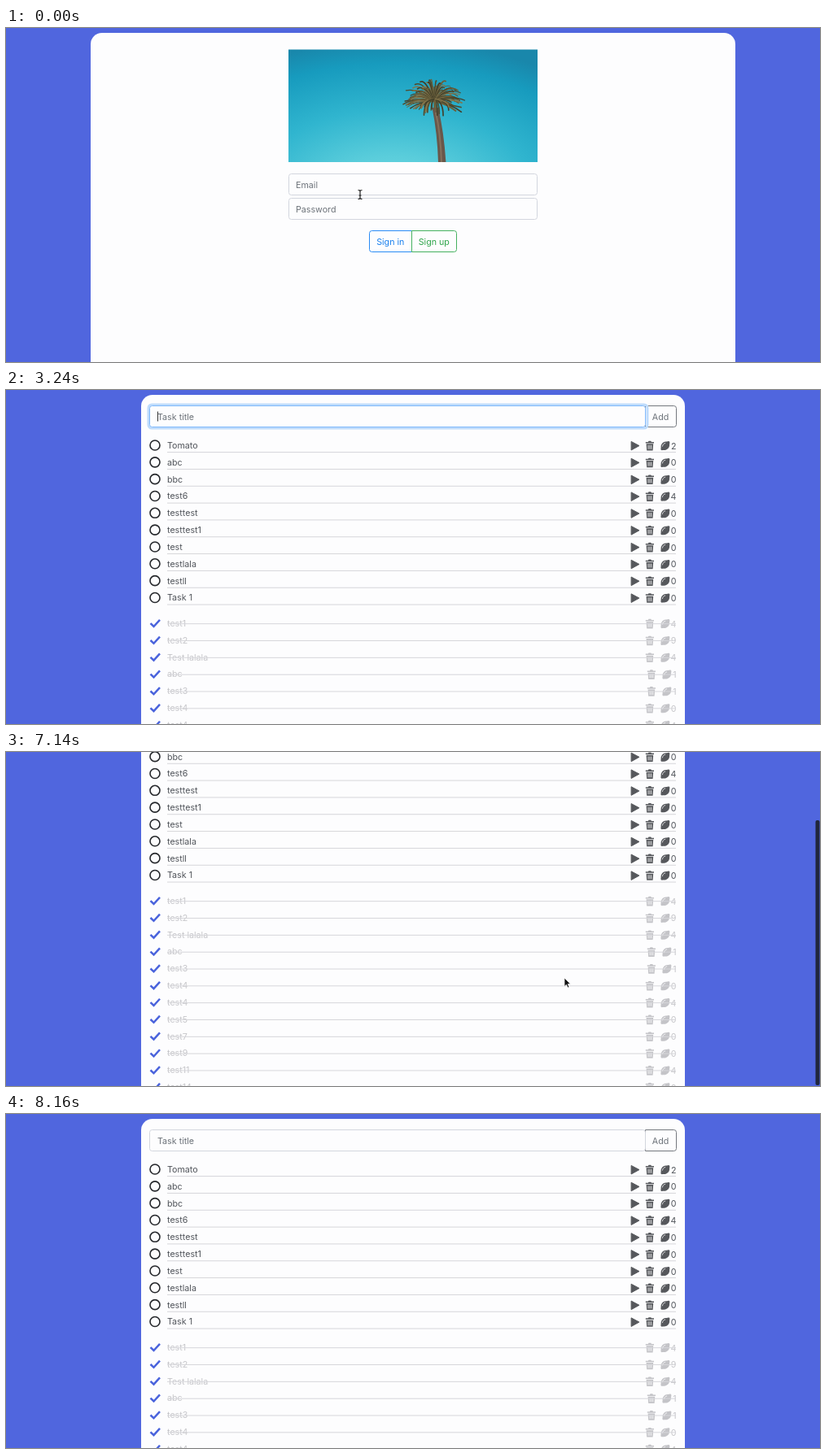
An HTML page for the animation above (8.19 s loop, 1000x411 px).

```html
<!DOCTYPE html>
<html lang="en">
<head>
<meta charset="utf-8">
<title>Task list</title>
<style>
html, body { margin: 0; width: 100%; height: 100%; overflow: hidden; background: #5066de; }
svg { display: block; width: 1000px; height: 411px; }
text { font: 10.7px Inter, "Open Sans", sans-serif; fill: #50545a; }
.hint { fill: #6c7279; }
.panel { fill: #fdfdfe; }
.field { fill: #fdfdfe; stroke: #d3d6de; }
.focus { stroke: #80b9fb; }
.ring { fill: none; stroke: #bfdcfc; stroke-width: 3; }
.line { stroke: #d6d6da; stroke-width: 1; }
.done text { fill: #c6c6ca; }
.done .ico { color: #c4c4c8; }
.ico { color: #56585c; }
#pass.value { letter-spacing: -1px; }
</style>
</head>
<body>
<svg id="stage" viewBox="0 0 1000 411">
  <defs>
    <radialGradient id="sky" gradientUnits="userSpaceOnUse" cx="0" cy="0" r="1"
      gradientTransform="translate(475 205) scale(320 190)">
      <stop offset="0" stop-color="#76dbe4"/>
      <stop offset=".25" stop-color="#5acddb"/>
      <stop offset=".55" stop-color="#30b5cf"/>
      <stop offset=".85" stop-color="#179bbe"/>
      <stop offset="1" stop-color="#1987ab"/>
    </radialGradient>
    <clipPath id="frame"><rect x="347" y="26.5" width="306" height="138.5"/></clipPath>
    <g id="play"><path d="M.6-5.2 10.4 0 .6 5.4Z" fill="currentColor" stroke="currentColor" stroke-linejoin="round"/></g>
    <g id="trash">
      <path d="M0-4.9H3L3.7-6H6.5L7.2-4.9H10.2V-3.4H0ZM.8-2.6H9.4L8.8 5.6H1.4Z" fill="currentColor"/>
      <path d="M3.2-1V4M5.1-1V4M7-1V4" stroke="#fdfdfe" stroke-width=".8"/>
    </g>
    <g id="lemon">
      <path d="M11-5.4C9.5-6.2 8.5-5 7-5.2 3.5-5.5.3-2 .6 1.6.7 3 0 4 .8 5 1.7 5.8 2.6 5.1 4 5.2 8 5.5 11.5 2 11.1-1.6 11-3 11.9-4.2 11-5.4Z" fill="currentColor"/>
      <path d="M2.4.8C2.6-1.4 4-3 6.1-3.4" fill="none" stroke="#fdfdfe" stroke-width=".8"/>
    </g>
  </defs>

  <g id="login">
    <rect class="panel" x="104" y="6" width="792" height="440" rx="14"/>
    <g clip-path="url(#frame)">
      <rect x="347" y="26" width="306" height="140" fill="url(#sky)"/>
      <path d="M523.5 98Q530 130 531 166H540.5Q538 128 531 98Z" fill="#69574a"/>
      <path d="M528 104Q534 130 535 166" fill="none" stroke="#85705c" stroke-width="2"/>
      <g id="palm" fill="none" stroke-linecap="round"></g>
    </g>
    <rect id="mailRing" class="ring" x="345.5" y="178" width="309" height="29" rx="4"/>
    <rect id="mailBox" class="field" x="347.5" y="179.5" width="305" height="26" rx="3"/>
    <text id="mail" x="356" y="196.5"></text>
    <rect id="passRing" class="ring" x="345.5" y="207.5" width="309" height="29.5" rx="4"/>
    <rect id="passBox" class="field" x="347.5" y="209.5" width="305" height="26" rx="3"/>
    <text id="pass" x="356" y="226.5"></text>
    <path id="signIn" d="M498.5 249.5H449.5Q446.5 249.5 446.5 252.5V272.5Q446.5 275.5 449.5 275.5H498.5Z" stroke="#2a8cf5"/>
    <path class="panel" d="M498.5 249.5H550.5Q553.5 249.5 553.5 252.5V272.5Q553.5 275.5 550.5 275.5H498.5Z" stroke="#45b15f"/>
    <text id="signInText" x="472.3" y="266.7" text-anchor="middle">Sign in</text>
    <text x="525.8" y="266.7" text-anchor="middle" style="fill:#2ea44a">Sign up</text>
  </g>

  <g id="tasks">
    <rect class="panel" x="166" y="6" width="668" height="640" rx="14"/>
    <path class="panel" d="M785.5 19.5H820.5Q823.5 19.5 823.5 22.5V42.5Q823.5 45.5 820.5 45.5H785.5Z" stroke="#74787e"/>
    <text class="hint" x="804" y="36.8" text-anchor="middle">Add</text>
    <rect id="taskRing" class="ring" x="175" y="18" width="613" height="29" rx="4"/>
    <rect id="taskBox" class="field" x="176.5" y="19.5" width="609" height="26" rx="3"/>
    <text id="title" x="186" y="36.8"></text>
    <g id="open"></g>
    <g id="done" class="done"></g>
  </g>

  <path id="caret" stroke="#333" d="M0-6V6"/>
  <rect id="bar" x="994.5" width="5" rx="2" fill="#20263c"/>
  <g id="beam" fill="none" stroke="#222" stroke-width="1.2"><path d="M-2.5-5.5Q0-5.5 0-4Q0-5.5 2.5-5.5M0-4V4M-2.5 5.5Q0 5.5 0 4Q0 5.5 2.5 5.5M-1.5 1H1.5"/></g>
  <path id="arrow" d="M0 0V10.5L2.4 8.3 4.2 12 5.9 11.2 4.2 7.6H7.4Z" fill="#111" stroke="#fff" stroke-width=".7"/>
  <path id="hand" d="M-2-6Q-1-7 0-6L1.2-2 4-1.4Q6-1 5.7 1.2L5 4.8H-1L-4.6.6Q-4.4-1-2.6.2L-1.2 1Z" fill="#fff" stroke="#222" stroke-linejoin="round"/>
</svg>
<script>
const LOOP = 8190, STEP = 20.83;
const $ = id => document.getElementById(id);
const show = (id, on) => $(id).setAttribute("visibility", on ? "visible" : "hidden");
const move = (id, x, y) => $(id).setAttribute("transform", `translate(${x} ${y})`);

const OPEN = [["Tomato", 2], ["abc", 0], ["bbc", 0], ["test6", 4], ["testtest", 0], ["testtest1", 0],
  ["test", 0], ["testlala", 0], ["testll", 0], ["Task 1", 0]];
const DONE = [["test1", 4], ["test2", 9], ["Test lalala", 4], ["abc", 1], ["test3", 1], ["test4", 0],
  ["test4", 4], ["test5", 0], ["test7", 0], ["test9", 0], ["test11", 4], ["test14", 0]];

function row([name, count], i, done) {
  const y = (done ? 287 : 68) + i * STEP, dx = count === 1 ? 2 : 0;
  const mark = done
    ? `<path d="M177.5 .2 181.5 4 189-4.2" fill="none" stroke="#4a63dc" stroke-width="2.5"/>`
    : `<circle cx="183" r="6" fill="none" stroke="#26282c" stroke-width="1.6"/>`;
  const lineY = done ? .7 : 8.6;
  const play = done ? "" : `<use href="#play" x="767.5" y=".6"/>`;
  return `<g transform="translate(0 ${y.toFixed(2)})">${mark}<text x="198" y="4">${name}</text>
    <g class="ico">${play}<use href="#trash" x="${785.8 + dx}" y=".8"/><use href="#lemon" x="${804 + dx}" y=".8"/></g>
    <text x="823.5" y="4.6" text-anchor="end">${count}</text>
    <path class="line" d="M198 ${lineY}H823"/></g>`;
}
$("open").innerHTML = OPEN.map((r, i) => row(r, i, false)).join("");
$("done").innerHTML = DONE.map((r, i) => row(r, i, true)).join("");

// Spiky fronds around the crown
let seed = 7;
const rnd = () => (seed = seed * 16807 % 2147483647) / 2147483647;
const tones = ["#4f4a2e", "#6a5f3a", "#83744a", "#433f2a"];
let fronds = "";
for (let i = 0; i < 70; i++) {
  const a = Math.PI * (.82 + 1.36 * i / 69), len = .55 + .45 * rnd();
  const x = 525.5 + Math.cos(a) * 39 * len, y = 86 + Math.sin(a) * 24 * len;
  const drop = Math.abs(Math.cos(a)) * 9 * rnd();
  fronds += `<path d="M526 90Q${526 + (x - 526) * .6} ${y - 3} ${x} ${y + drop}" stroke="${tones[i % 4]}" stroke-width="${.9 + rnd()}"/>`;
}
for (let i = 0; i < 20; i++) {
  const x = 508 + 36 * rnd();
  fronds += `<path d="M526 87Q${x} 90 ${x} ${96 + 12 * rnd()}" stroke="${tones[i % 4]}" stroke-width="1.7"/>`;
}
$("palm").innerHTML = fronds;

// Rows of [time, values...], eased between neighbours
function at(track, t) {
  let i = 0;
  while (i < track.length - 1 && track[i + 1][0] <= t) i++;
  const a = track[i], b = track[i + 1] || a;
  const p = b === a ? 0 : Math.max(0, (t - a[0]) / (b[0] - a[0])), e = p * p * (3 - 2 * p);
  return a.slice(1).map((v, k) => v + (b[k + 1] - v) * e);
}
const POINTER = [[0, 435, 205], [120, 428, 194], [780, 452, 226], [900, 470, 262], [1200, 479, 272], [1500, 481, 279],
  [1740, 481, 279], [2250, 440, 34], [3400, 440, 40], [3750, 200, 72], [4150, 184, 250], [4500, 184, 376],
  [4850, 772, 252], [5250, 812, 252], [5480, 793, 258], [5800, 793, 258], [6500, 700, 275], [6750, 686, 278]];
const SCROLL = [[6820, 0], [7140, 104], [7380, 118], [7620, 118], [8010, 0]];
const typed = (s, t, from, to) => s.slice(0, Math.max(0, Math.floor((t - from) / (to - from) * s.length + .001)));
const within = (t, a, b) => t >= a && t < b;

function field(id, value, hint) {
  $(id).textContent = value || hint;
  $(id).setAttribute("class", value ? "value" : "hint");
}
function focus(name, on) {
  show(name + "Ring", on);
  $(name + "Box").classList.toggle("focus", on);
}
function caretAt(id, value, y) {
  const w = value ? $(id).getComputedTextLength() : 0;
  move("caret", +$(id).getAttribute("x") + w + .5, y);
}

function draw(t) {
  const login = t < 1635;
  $("login").style.display = login ? "" : "none";
  $("tasks").style.display = login ? "none" : "";
  const scroll = at(SCROLL, t)[0];
  let caret = false;

  if (login) {
    const mail = typed("demo@abc.test", t, 180, 540), pass = typed("••••••", t, 580, 740);
    const onMail = within(t, 150, 560), onPass = t >= 560, hover = t >= 900;
    field("mail", mail, "Email");
    field("pass", pass, "Password");
    focus("mail", onMail);
    focus("pass", onPass);
    $("signIn").setAttribute("fill", hover ? "#0878fa" : "#fdfdfe");
    $("signInText").style.fill = hover ? "#fff" : "#1a80ee";
    caret = within(t, 150, 780);
    if (onPass) caretAt("pass", pass, 222.5);
    else caretAt("mail", mail, 192.5);
  } else {
    const added = t >= 3120, active = within(t, 2280, 3500);
    const title = added ? "" : typed("Task 1", t, 2600, 2960);
    field("title", title, "Task title");
    focus("task", active);
    show("open", t >= 1710);
    show("done", t >= 1710);
    $("open").lastElementChild.style.display = added ? "" : "none";
    move("done", 0, added ? 0 : -STEP);
    move("tasks", 0, -scroll);
    caret = active;
    caretAt("title", title, 32.5);
  }
  show("caret", caret);

  const page = 411 + Math.max(104, scroll), bar = $("bar");
  show("bar", within(t, 6840, 7300) || within(t, 7650, 8100));
  bar.setAttribute("y", scroll / page * 411 + 1);
  bar.setAttribute("height", 411 * 411 / page - 2);

  const [x, y] = at(POINTER, t);
  const hidden = within(t, 180, 780) || within(t, 2600, 3400) || t >= 8040;
  const kind = hidden ? "" : t < 900 || within(t, 2200, 3560) ? "beam" : t < 1740 ? "hand" : "arrow";
  for (const k of ["beam", "hand", "arrow"]) {
    show(k, k === kind);
    move(k, x, y);
  }
}

const start = performance.now();
function tick() {
  draw((performance.now() - start) % LOOP);
  requestAnimationFrame(tick);
}
tick();
</script>
</body>
</html>
```
